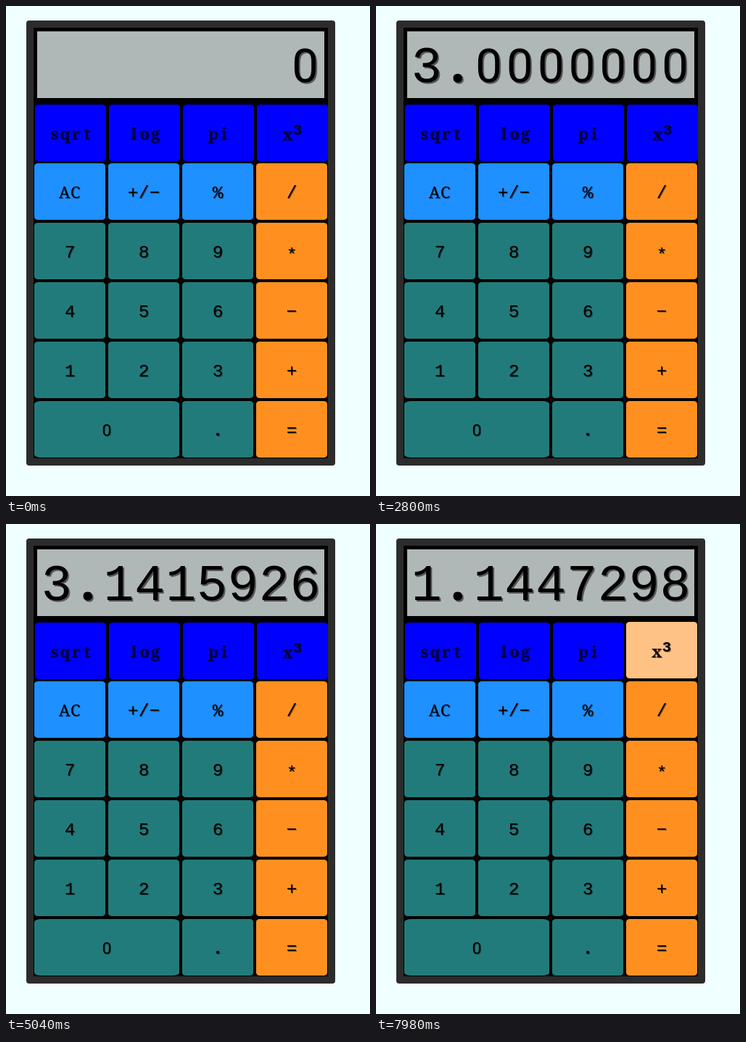
Animation, 502 px wide and 676 px high, one loop 8000 ms. Source, as an HTML page:

```html
<!DOCTYPE html>
<html lang="en">
<head>
<meta charset="utf-8">
<title>Calculator</title>
<style>
  html, body { margin: 0; width: 100%; height: 100%; overflow: hidden; background: #f0ffff; }
  svg { display: block; width: 502px; height: 676px; }
  text { text-anchor: middle; }
  .label { filter: drop-shadow(1px 1px 0.5px rgba(0, 0, 0, .45)); }
  .screen { filter: drop-shadow(2px 2px 0.5px #555); }
  .mono { font-family: "Liberation Mono", monospace; }
  .slab { font-family: "Noto Serif", serif; }
  .zero { font-family: Roboto, sans-serif; }
  .dot { font-family: "Noto Sans", sans-serif; font-weight: 700; }
</style>
</head>
<body>
<svg viewBox="0 0 502 676"></svg>
<script>
const LOOP = 8000;
const svg = document.querySelector('svg');

const COLORS = {
  digit: ['#227b7b', '#33b9b9'],
  tool: ['#1e90ff', '#ffc285'],
  op: ['#ff9020', '#ffc285'],
  func: ['#0000ff', '#ffc285']
};

const ROWS = [
  ['sqrt', 'log', 'pi', 'x3'],
  ['AC', '+/−', '%', '/'],
  ['7', '8', '9', '*'],
  ['4', '5', '6', '−'],
  ['1', '2', '3', '+'],
  ['0', null, '.', '=']
];

// [time, screen text, pressed key]
const STEPS = [
  [0, '0', ''],
  [1820, '0', '9'],
  [1960, '9', ''],
  [2590, '9', 'sqrt'],
  [2730, '3.0000000', ''],
  [4060, '3.0000000', '*'],
  [4830, '3.0000000', 'pi'],
  [4970, '3.1415926', ''],
  [6720, '3.1415926', 'log'],
  [6860, '1.1447298', ''],
  [7980, '1.1447298', 'x3']
];

function add(parent, tag, attrs) {
  const el = document.createElementNS('http://www.w3.org/2000/svg', tag);
  for (const name in attrs) el.setAttribute(name, attrs[name]);
  return parent.appendChild(el);
}

function rect(parent, x, y, width, height, fill, rx = 0, ry = rx) {
  return add(parent, 'rect', { x, y, width, height, fill, rx, ry });
}

function glyphStyle(ch) {
  if (ch === '0') return ['zero', 0.91];
  if (ch === '.') return ['dot', 1];
  return /[a-z]/i.test(ch) ? ['slab', 0.88] : ['mono', 0.98];
}

function glyph(parent, ch, x, y, em, weight) {
  const [name, scale] = glyphStyle(ch);
  const el = add(parent, 'text', {
    class: name, x, y, 'font-size': em * scale, 'font-weight': weight
  });
  el.textContent = ch;
}

// Sets each character in the middle of a fixed-pitch cell.
function write(parent, str, cx, y, em, weight = 400) {
  const pitch = em * 0.6;
  [...str].forEach((ch, i, all) =>
    glyph(parent, ch, cx + (i - (all.length - 1) / 2) * pitch, y, em, weight));
}

function kindOf(row, col) {
  if (row === 0) return 'func';
  if (col === 3) return 'op';
  return row === 1 ? 'tool' : 'digit';
}

function makeKey(name, row, col) {
  const x = 39 + col * 102, y = 135 + row * 82;
  const w = name === '0' ? 200 : 98;
  const kind = kindOf(row, col);
  const group = add(svg, 'g', {});
  const face = rect(group, x, y, w, 78, COLORS[kind][0], w * 0.05, 4);
  const label = add(group, 'g', { class: 'label' });
  const cx = x + w / 2, base = y + (name === '*' ? 52 : 48);
  if (name === 'x3') {
    glyph(label, 'x', cx - 7, base + 1, 25, 700);
    glyph(label, '3', cx + 7, base - 7, 21, 700);
  } else {
    write(label, name, cx, base, 25, kind === 'func' ? 700 : 400);
  }
  return { name, kind, group, face, label };
}

function paintKey(key, pressed) {
  const raised = key.kind === 'func' && !pressed;
  key.face.setAttribute('fill', COLORS[key.kind][pressed ? 1 : 0]);
  key.label.setAttribute('fill', raised ? '#000038' : '#000');
  key.group.setAttribute('transform', raised ? 'translate(1 1)' : '');
}

rect(svg, 28, 20, 426, 614, '#2c2c2c', 4);
rect(svg, 38, 30, 406, 594, '#000');
rect(svg, 43, 35, 396, 92, '#b0b8b7');
const screen = add(svg, 'g', { class: 'screen' });
const keys = ROWS.flatMap((names, row) =>
  names.map((name, col) => name && makeKey(name, row, col)).filter(Boolean));

function show([, value, pressed]) {
  const em = 71.4, pitch = em * 0.6;
  screen.replaceChildren();
  write(screen, value, 412.5 - (value.length - 1) / 2 * pitch, 105, em);
  keys.forEach(key => paintKey(key, key.name === pressed));
}

const start = performance.now();
let current;

function frame() {
  const t = (performance.now() - start) % LOOP;
  const step = STEPS.findLast(s => s[0] <= t);
  if (step !== current) show(current = step);
  requestAnimationFrame(frame);
}
frame();
</script>
</body>
</html>
```
